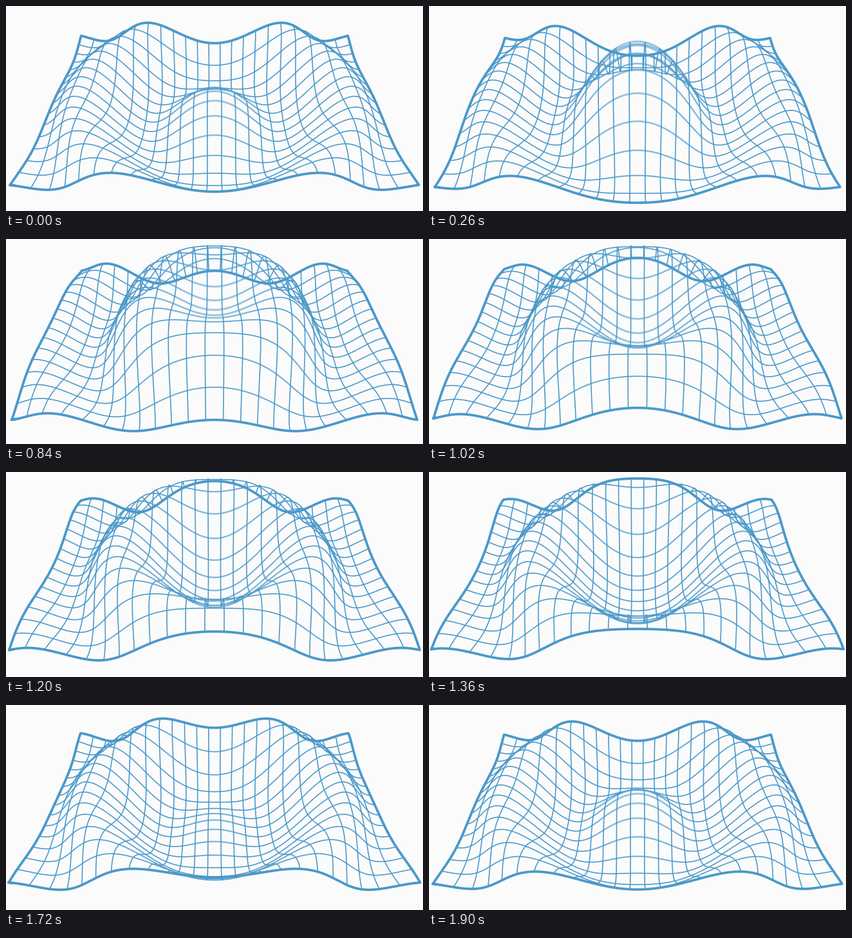
Animation, 648 px wide and 320 px high, one loop 1920 ms. Source, as a matplotlib script:

```python
import matplotlib.pyplot as plt
import numpy as np
from matplotlib.animation import FuncAnimation
from matplotlib.collections import LineCollection

W, H, DPI = 648, 320, 80
FRAMES, STEP = 96, 20
COLS, ROWS = 23, 15
BLUE, PAPER = "#4a98ca", "#fbfbfb"

DEPTH = 0.645                 # half depth of the sheet; half width is 1
NEAR, FAR = 317, 207          # half widths on screen, in pixels
HORIZON, DROP = -391, 2.117
TILT = np.radians(50)
FOCUS = 778

AMP, DECAY, TWIST = 0.459, 2.11, 6.78
SHUTTER, SAMPLES = 0.5, 5     # motion blur


def height(x, y, t):
    q = x * x + y * y
    return AMP * np.exp(-DECAY * q) * np.sin(2 * np.pi * t - TWIST * q)


def project(x, y, t):
    z = height(x, y, t)
    u = (y / DEPTH + 1) / 2
    s = 1 / ((1 - u) / NEAR + u / FAR)
    zoom = s / (1 - z * np.tan(TILT) * s / FOCUS)
    py = HORIZON + DROP * zoom * (1 - z / (DROP * np.cos(TILT)))
    return np.stack([W / 2 + x * zoom, py], axis=-1)


def grid_lines():
    xs, ys = np.linspace(-1, 1, 121), np.linspace(-DEPTH, DEPTH, 121)
    rows = [(xs, np.full_like(xs, y)) for y in np.linspace(-DEPTH, DEPTH, ROWS + 1)]
    cols = [(np.full_like(ys, x), ys) for x in np.linspace(-1, 1, COLS + 1)]
    rim = [rows[0], cols[-1], tuple(a[::-1] for a in rows[-1]),
           tuple(a[::-1] for a in cols[0])]
    return np.array(rows[1:-1] + cols[1:-1]), np.concatenate(rim, axis=1)


def px(n):
    return n * 72 / DPI


fig = plt.figure(figsize=(W / DPI, H / DPI), dpi=DPI, facecolor=PAPER)
ax = fig.add_axes([0, 0, 1, 1])
ax.set_xlim(0, W)
ax.set_ylim(H, 0)
ax.axis("off")

mesh, rim = grid_lines()
net = LineCollection([], colors=BLUE, linewidths=px(1.6))
ax.add_collection(net, autolim=False)
edge, = ax.plot([], [], color=BLUE, lw=px(3.8), solid_joinstyle="round")


def snapshot(t):
    net.set_segments(project(mesh[:, 0], mesh[:, 1], t))
    pts = project(rim[0], rim[1], t)
    edge.set_data(np.vstack([pts, pts[:2]]).T)
    fig.canvas.draw()
    return np.asarray(fig.canvas.buffer_rgba())[..., :3].astype(float)


def exposure(i):
    offsets = ((np.arange(SAMPLES) + 0.5) / SAMPLES - 0.5) * SHUTTER
    total = sum(snapshot((i + d) / FRAMES) for d in offsets)
    return np.round(total / SAMPLES).astype(np.uint8)


shots = [exposure(i) for i in range(FRAMES)]
net.remove()
edge.remove()
screen = ax.imshow(shots[0], extent=(0, W, H, 0), aspect="auto", interpolation="none")


def update(i):
    screen.set_data(shots[i])
    return screen,


anim = FuncAnimation(fig, update, frames=FRAMES, interval=STEP, repeat=True, blit=False)
plt.show()
```
